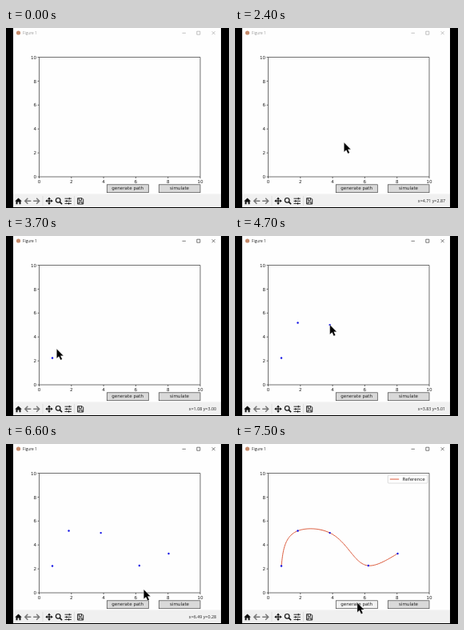
An HTML page for the animation above (8000 ms loop, 279 px wide and 225 px high).

```html
<!DOCTYPE html>
<html lang="en">
<head>
<meta charset="utf-8">
<title>Figure 1</title>
<style>
  html, body { margin: 0; width: 100%; height: 100%; overflow: hidden; background: #000; }
  svg { display: block; width: 279px; height: 225px; }
  text { font: 5.6px "DejaVu Sans", sans-serif; fill: #222; }
  .ui { font: 4.75px "Open Sans", sans-serif; fill: #222; }
  #coords { font-size: 5.35px; }
  .line { fill: none; stroke: #333; stroke-width: .7; }
  .chrome { fill: none; stroke: #222; stroke-width: .6; }
  .idle .chrome { stroke: #999; }
  .idle .title { fill: #999; }
  .button { fill: #d9d9d9; stroke: #444; stroke-width: .7; }
  .button.hover { fill: #f2f2f2; }
  .mid { text-anchor: middle; }
  .end { text-anchor: end; }
  .icon { fill: none; stroke: #111; stroke-width: 1.2; }
  .dim { stroke: #777; }
  .path { fill: none; stroke: #dc5b3c; stroke-width: 1; }
</style>
</head>
<body>
<svg viewBox="0 0 279 225">
  <rect x="9" width="260" height="224" fill="#fefefe"/>

  <g id="bar">
    <circle cx="15.5" cy="6" r="2.6" fill="#c58b6c"/>
    <text class="ui title" x="21" y="8">Figure 1</text>
    <path class="chrome" d="M220.5 6.3h4.4M238.8 4.2h4v4h-4zM257.6 4.2l4 4m0-4l-4 4"/>
  </g>

  <g id="axes"></g>
  <g id="result">
    <path id="spline" class="path"/>
    <rect x="191.3" y="39" width="49.6" height="10" rx="1" fill="#fff" stroke="#ccc" stroke-width=".7"/>
    <path class="path" d="M193.8 44h11.4"/>
    <text x="209.6" y="46">Reference</text>
  </g>
  <g id="dots" fill="#1414e6"></g>

  <rect id="generate" class="button" x="126.3" y="195.8" width="52" height="9.9"/>
  <text class="mid" x="152.2" y="202.3">generate path</text>
  <rect class="button" x="191.3" y="195.8" width="51.7" height="9.9"/>
  <text class="mid" x="217" y="202.3">simulate</text>

  <rect x="9" y="207.5" width="260" height="16.5" fill="#f0f0f0"/>
  <g class="icon">
    <path d="M11.2 216.6l4.3-4.2 4.3 4.2h-1.3v3.6h-2v-2.6h-2v2.6h-2v-3.6z" fill="#111" stroke="none"/>
    <path class="dim" stroke-width="1.5" d="M31.3 216.2h-7M27.3 212.7l-3.5 3.5 3.5 3.5M34.2 216.2h7M38.2 212.7l3.5 3.5-3.5 3.5"/>
    <path d="M50.5 216.2h7M54 212.7v7"/>
    <path d="M54 211.5l1.9 2.4h-3.8zM54 220.9l1.9-2.4h-3.8zM49.3 216.2l2.4-1.9v3.8zM58.7 216.2l-2.4-1.9v3.8z" fill="#111" stroke="none"/>
    <circle cx="65.2" cy="215.3" r="2.8"/>
    <path stroke-width="1.6" d="M67.3 217.4l2.8 2.9"/>
    <path stroke-width=".9" d="M73.5 213.2h8.4M73.5 216.3h8.4M73.5 219.4h8.4M79.3 211.9v2.6M75.8 215v2.6M78.6 218.1v2.6"/>
    <path stroke="#ccc" stroke-width=".5" d="M46 210v12M85.5 210v12"/>
    <path d="M89.6 212.7h5.6l1.5 1.5v5.8h-7.1zM91.2 213v2.4h3.4V213M91.2 220v-2.6h3.9v2.6" stroke-width=".9"/>
  </g>
  <text id="coords" class="ui end" x="263" y="218.3"></text>

  <path id="cursor" d="M0 0V12L2.8 9.5 4.9 14 7 13 5 8.7H8.6Z" fill="#000" stroke="#fff" stroke-width=".3"/>
</svg>
<script>
const $ = id => document.getElementById(id);
const LOOP = 8000, STEP = 100;
const px = x => 41.5 + 20.15 * x;
const py = y => 186 - 14.95 * y;

// Waypoints: x, y, time of the click
const points = [[.82, 2.24, 3300], [1.84, 5.18, 4300], [3.83, 5.01, 4700], [6.22, 2.27, 5400], [8.04, 3.28, 6100]];

// Pointer: time, x, y in axis units
const moves = [
  [1700, 10.55, 3.81], [2000, 7.4, 3.15], [2100, 7.4, 3.15], [2800, .56, 2.44], [3000, .82, 2.24],
  [3500, .82, 2.24], [4100, 1.84, 5.18], [4300, 1.84, 5.18], [4700, 3.83, 5.01], [4800, 3.83, 5.01],
  [5100, 6.22, 2.27], [5500, 6.22, 2.27], [5800, 8.04, 3.28], [6300, 8.04, 3.28],
  [6600, 6.49, .28], [7100, 5.53, -.83]
];

function drawAxes() {
  let ticks = '', labels = '';
  for (let v = 0; v <= 10; v += 2) {
    ticks += `M${px(v)} 186v2M41.5 ${py(v)}h-2`;
    labels += `<text class="mid" x="${px(v)}" y="194.4">${v}</text>` +
              `<text class="end" x="38" y="${py(v) + 2.1}">${v}</text>`;
  }
  $('axes').innerHTML = `<path class="line" d="M41.5 36.5H243V186H41.5z${ticks}"/>${labels}`;
}

// Natural cubic spline through v at knots s
function spline(s, v) {
  const n = s.length, h = i => s[i + 1] - s[i], slope = i => (v[i + 1] - v[i]) / h(i);
  const m = Array(n).fill(0), c = [0], d = [0];
  for (let i = 1; i < n - 1; i++) {
    const w = 2 * (h(i - 1) + h(i)) - h(i - 1) * c[i - 1];
    c[i] = h(i) / w;
    d[i] = (6 * (slope(i) - slope(i - 1)) - h(i - 1) * d[i - 1]) / w;
  }
  for (let i = n - 2; i > 0; i--) m[i] = d[i] - c[i] * m[i + 1];
  return t => {
    let i = 0;
    while (i < n - 2 && t > s[i + 1]) i++;
    const u = t - s[i], k = h(i);
    return v[i] + u * (slope(i) - k * (2 * m[i] + m[i + 1]) / 6)
      + u * u * m[i] / 2 + u ** 3 * (m[i + 1] - m[i]) / (6 * k);
  };
}

function drawPath() {
  const s = [0];
  for (let i = 1; i < points.length; i++) {
    const [a, b] = [points[i - 1], points[i]];
    s.push(s[i - 1] + Math.hypot(b[0] - a[0], b[1] - a[1]));
  }
  const fx = spline(s, points.map(p => p[0])), fy = spline(s, points.map(p => p[1]));
  const end = s[s.length - 1], steps = 110;
  let d = '';
  for (let i = 0; i <= steps; i++) {
    const t = end * i / steps;
    d += (i ? 'L' : 'M') + px(fx(t)).toFixed(2) + ' ' + py(fy(t)).toFixed(2);
  }
  $('spline').setAttribute('d', d);
}

function pointer(t) {
  const i = moves.findIndex(m => m[0] > t);
  if (i < 0) return moves[moves.length - 1].slice(1);
  const [a, b] = [moves[i - 1], moves[i]];
  const k = (t - a[0]) / (b[0] - a[0]), e = k * k * (3 - 2 * k);
  return [a[1] + (b[1] - a[1]) * e, a[2] + (b[2] - a[2]) * e];
}

const show = (el, on) => { el.style.display = on ? '' : 'none'; };

function render(t) {
  const visible = t >= moves[0][0];
  const [x, y] = visible ? pointer(t) : [-1, -1];
  const inside = x >= 0 && x <= 10 && y >= 0 && y <= 10;
  const cx = px(x), cy = py(y);
  show($('cursor'), visible);
  $('cursor').setAttribute('transform', `translate(${cx} ${cy})`);
  $('coords').textContent = inside ? `x=${x.toFixed(2)} y=${y.toFixed(2)}` : '';
  $('bar').classList.toggle('idle', t < points[0][2]);
  $('generate').classList.toggle('hover', visible && cy > 195.8 && cx > 126 && cx < 179);
  points.forEach((p, i) => show($('dots').children[i], t >= p[2]));
  show($('result'), t >= 7400);
}

drawAxes();
drawPath();
$('dots').innerHTML = points.map(p => `<circle cx="${px(p[0])}" cy="${py(p[1])}" r="1.2"/>`).join('');

const start = performance.now();
function tick() {
  const t = (performance.now() - start) % LOOP;
  render(Math.floor(t / STEP) * STEP);
  requestAnimationFrame(tick);
}
tick();
</script>
</body>
</html>
```
